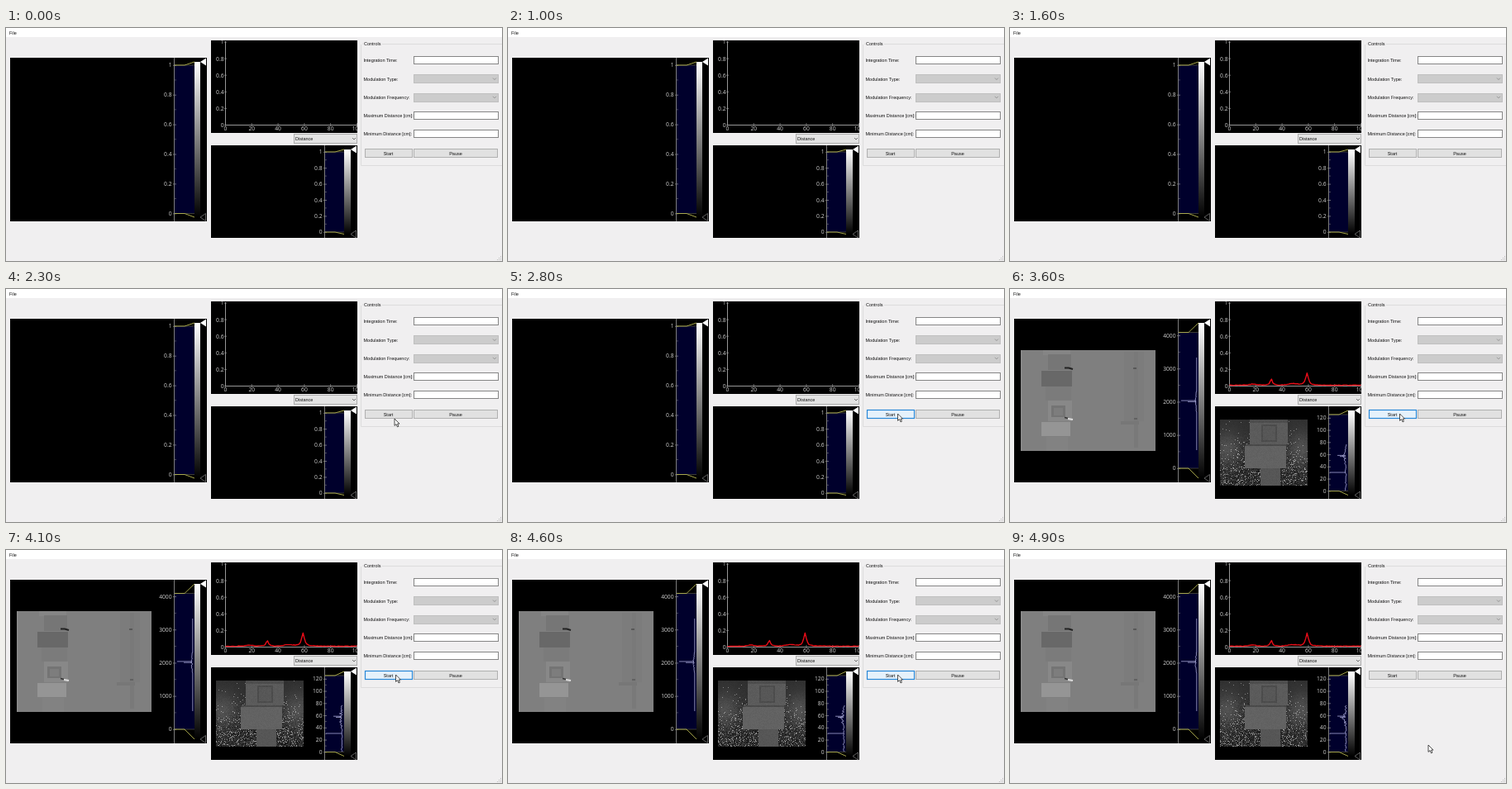
An HTML page with a canvas for the animation above (5 s loop, 600 by 282 pixels).

```html
<!DOCTYPE html>
<html lang="en">
<head>
<meta charset="utf-8">
<title>Sensor viewer</title>
<style>
  html, body { margin: 0; width: 100%; height: 100%; overflow: hidden; background: #f0eff0; }
  svg, canvas { position: absolute; display: block; }
  svg { left: 0; top: 0; }
  canvas { left: 254px; top: 158px; visibility: hidden; }
  text { font: 5.5px "Liberation Sans", Arial, sans-serif; fill: #111; }
  .tick { font: 6.7px "Open Sans", "Noto Sans", sans-serif; fill: #d4d4d4; }
</style>
</head>
<body>
<svg id="stage" width="600" height="282" viewBox="0 0 600 282"></svg>
<canvas id="depth" width="106" height="80"></canvas>
<script>
const LOOP = 5000, STEP = 100, LIVE_AT = 3600;
const HOVER_FROM = 2500, HOVER_TO = 4700;

// time, x, y of the pointer tip
const POINTER = [
  [2100, 500, 230], [2200, 479, 180], [2300, 470, 157], [2400, 470, 156],
  [2500, 471, 152], [2600, 471.5, 151], [4700, 479, 170], [4800, 497, 214], [4900, 506, 236]
];

const rect = (x, y, w, h, fill, extra = '') =>
  `<rect x="${x}" y="${y}" width="${w}" height="${h}" fill="${fill}" ${extra}/>`;
const path = (d, stroke, width = 1, extra = '') =>
  `<path d="${d}" fill="none" stroke="${stroke}" stroke-width="${width}" ${extra}/>`;
const label = (x, y, s, extra = '') => `<text x="${x}" y="${y}" ${extra}>${s}</text>`;
const tick = (x, y, s, anchor = 'end') =>
  label(x, y + 2.4, s, `class="tick" text-anchor="${anchor}"`);
const box = (x, y, w, h, fill, stroke, extra = '') =>
  rect(x + .5, y + .5, w - 1, h - 1, fill, `stroke="${stroke}" ${extra}`);
const chevron = (x, y, color) => path(`M${x - 2} ${y - 1}l2 2l2 -2`, color, .8);

function random(seed) {
  let a = seed >>> 0;
  return () => {
    a = a + 0x6D2B79F5 | 0;
    let r = Math.imul(a ^ a >>> 15, 1 | a);
    r = r + Math.imul(r ^ r >>> 7, 61 | r) ^ r;
    return ((r ^ r >>> 14) >>> 0) / 4294967296;
  };
}

// Level range, axis ticks and slanted lines to the gradient bar
function levels(p, top, bottom, marks) {
  const x = p.axis, n = marks.length - 1;
  const first = marks[0].y, gap = (marks[n].y - first) / n;
  let out = rect(x + 1, top, p.bar - x - 1, bottom - top, '#00002c');
  let major = '', minor = '';
  marks.forEach((m, i) => {
    out += tick(x - 2.5, m.y, m.s);
    major += `M${x - 1} ${m.y + .3}h4`;
    if (i < n) minor += `M${x + 1} ${first + gap * (i + .5)}h2`;
  });
  out += path(major, '#999', .7) + path(minor, '#777', .6);
  out += path(`M${x + 1} ${top}H${p.bar}M${x + 1} ${bottom}H${p.bar}`, '#62624a', .6);
  out += path(`M${x + 1} ${top}h12L${p.bar} ${p.top}M${x + 1} ${bottom}h12L${p.bar} ${p.bottom}`, '#b5b552', .9);
  return out;
}

function bar(p) {
  const w = p.wide, x = p.bar + w;
  return path(`M${p.axis + .5} ${p.y}V${p.y + p.h}`, '#8c8c8c', .9) +
    rect(p.bar, p.top, w, p.bottom - p.top, 'url(#ramp)') +
    `<path d="M${x} ${p.top}l7 -4.5v9z" fill="#fff"/>` +
    `<path d="M${x} ${p.bottom}l6.5 -4.5v9z" fill="#000" stroke="#888" stroke-width=".7"/>`;
}

const scale = (names, y0, y1) =>
  names.map((s, i) => ({ s, y: y0 + (y1 - y0) * i / (names.length - 1) }));

const UNIT = ['1', '0.8', '0.6', '0.4', '0.2', '0'];
const LEFT = { axis: 203, bar: 228, wide: 7, top: 41, bottom: 229, y: 36, h: 198 };
const LOW = { axis: 385, bar: 409, wide: 8, top: 147, bottom: 249.5, y: 142, h: 112 };

function amplitude() {
  return `<g filter="url(#soft)" clip-path="url(#amp)">` +
    rect(13, 74, 163, 122, '#7f7f7f') +
    rect(13, 74, 1.5, 122, '#8b8b8b') +
    rect(40, 74, 33, 6, '#858585') +
    rect(46, 79, 28, 19, '#767676') +
    rect(38, 99, 37, 19, '#686868') +
    rect(43, 118, 31, 17, '#7b7b7b') +
    rect(46, 135, 29, 25, '#888') +
    rect(50, 141, 17, 14, '#747474') +
    rect(53, 144, 11, 9, '#7d7d7d') +
    rect(38, 161, 35, 17, '#959595') +
    rect(44, 179, 26, 17, '#828282') +
    rect(138, 76, 24, 84, '#7c7c7c') +
    rect(150, 76, 5, 116, '#797979') +
    rect(134, 160, 22, 4, '#777') +
    path('M66 95.5h5l5 1.5', '#222', 2) +
    path('M66 155.5l4 1', '#333', 1.5) + path('M70 157l6 1', '#ddd', 2) +
    path('M149 96h4', '#505050', 1.6) + path('M150 157h4', '#5c5c5c', 1.6) +
    '</g>';
}

function controls() {
  let out = path('M431 19H432M455 19.5H600M429.5 20V166.5H600', '#dcdcdc');
  out += label(433, 20.8, 'Controls');
  const rows = ['Integration Time:', 'Modulation Type:', 'Modulation Frequency:',
    'Maximum Distance [cm]:', 'Minimum Distance [cm]:'];
  rows.forEach((name, i) => {
    const y = 39.3 + 22.25 * i, top = Math.round(y - 5.2), list = i == 1 || i == 2;
    out += label(432.5, y + 2, name);
    out += list ? box(493, top, 103, 11, '#ccc', '#bfbfbf') + chevron(591, y, '#888')
      : box(493, top, 103, 10, '#fff', '#858585');
  });
  return out + '<g id="start"></g>' + box(493, 146, 102, 11, '#e1e1e1', '#b0b0b0') +
    label(544, 153.5, 'Pause', 'text-anchor="middle"');
}

function build() {
  const dots = [[598, 276], [596, 278], [598, 278], [594, 280], [596, 280], [598, 280]];
  let topPlot = rect(248, 15, 177, 112, '#000') + '<g clip-path="url(#plot)">';
  let marks = '';
  UNIT.forEach((s, i) => {
    topPlot += tick(263.5, 17 + 20.1 * i, s);
    marks += `M264 ${17 + 20.1 * i}h3`;
    topPlot += tick(265.5 + 31.8 * i, 121.8, String(20 * i), 'middle');
    marks += `M${265.5 + 31.8 * i} 115v4`;
  });
  topPlot += path('M265.5 16V117.5H425', '#a8a8a8', .9) + path(marks, '#999', .7) +
    '<path id="curve" fill="none" stroke="#e80c18" stroke-width="1.4" stroke-linejoin="round"/></g>';

  const idle = levels(LEFT, 45, 224.5, scale(UNIT, 45, 224.5)) +
    levels(LOW, 150, 247, scale(UNIT, 150, 247));
  const live = levels(LEFT, 52.5, 217, scale(['4000', '3000', '2000', '1000', '0'], 56.3, 217)) +
    levels(LOW, 152, 244.5, scale(['120', '100', '80', '60', '40', '20', '0'], 156, 244.5)) +
    amplitude() + path('', '#a9a9d6', .8, 'id="histLeft"') + path('', '#a9a9d6', .8, 'id="histLow"');

  document.getElementById('stage').innerHTML = `<defs>
    <linearGradient id="ramp" x1="0" y1="0" x2="0" y2="1"><stop stop-color="#fff"/><stop offset="1"/></linearGradient>
    <filter id="soft" x="0" y="0" width="1" height="1"><feGaussianBlur stdDeviation=".4"/></filter>
    <clipPath id="plot">${rect(248, 15, 177, 112, '#000')}</clipPath>
    <clipPath id="amp">${rect(13, 74, 163, 122, '#000')}</clipPath></defs>` +
    rect(0, 0, 600, 282, '#f0eff0') + rect(0, 0, 600, 11, '#fff') + label(4, 7.8, 'File') +
    rect(5, 36, 238, 198, '#000') + topPlot + rect(248, 142, 177, 112, '#000') +
    `<g id="idle">${idle}</g><g id="live">${live}</g>` + bar(LEFT) + bar(LOW) +
    box(348, 128, 77, 12, '#e3e3e3', '#adadad') + label(350, 136, 'Distance') + chevron(421, 134, '#555') +
    controls() + dots.map(([x, y]) => rect(x, y, 1, 1, '#bbb')).join('') +
    '<path id="pointer" d="M0 0V8.4L2 6.6L3.5 9.9L4.9 9.2L3.5 6.1H6Z" fill="#fff" stroke="#222" stroke-width=".8"/>';
}

const inside = (x, y, l, t, r, b) => x >= l && x < r && y >= t && y < b;

// Grey value of the object in the depth picture, or 0 outside it
function objectGrey(x, y) {
  if (inside(x, y, 31, 30, 80, 32)) return 74;
  if (inside(x, y, 30, 32, 80, 59)) return 98;
  if (inside(x, y, 36, 0, 82, 30)) {
    if (inside(x, y, 50, 6, 69, 27))
      return inside(x, y, 52, 8, 67, 25) ? 87 : 76;
    return y < 4 ? 78 : 91;
  }
  if (inside(x, y, 49, 59, 73, 80)) return 86;
  return 0;
}

function drawDepth(n) {
  const fixed = random(77), flick = random(900 + n * 131);
  const image = ctx.createImageData(106, 80);
  for (let i = 0; i < 106 * 80; i++) {
    const x = i % 106, y = i / 106 | 0;
    const a = fixed(), b = flick();
    let v = objectGrey(x, y);
    if (v) v += (b - .5) * 7;
    else {
      const glow = Math.exp(-(((x - 8) / 18) ** 2) - ((y - 36) / 21) ** 2) +
        Math.exp(-(((x - 98) / 17) ** 2) - ((y - 36) / 21) ** 2);
      const rough = Math.min(1, Math.max(.08, (y - 10) / 38)) * (1 - .72 * Math.min(1, glow));
      const r = b < .45 ? flick() : a;
      v = 47 + 34 * glow + (r - .5) * 56 * rough;
      if (r > 1 - .13 * rough) v += 75;
    }
    image.data.set([v, v, v, 255], i * 4);
  }
  ctx.putImageData(image, 0, 0);
}

function drawTraces(n) {
  const rnd = random(n * 57 + 5);
  const near = .068 + rnd() * .018, far = .145 + rnd() * .02;
  const peak = (x, c, w) => 1 / (1 + ((x - c) / w) ** 2);
  let d = 'M';
  for (let x = 0; x <= 100; x++) {
    const value = .006 + rnd() * .006 + near * peak(x, 31.8, 1) + far * peak(x, 59, 1.25) +
      .012 * Math.exp(-(((x - 18) / 4) ** 2)) + .017 * Math.exp(-(((x - 48) / 5) ** 2));
    d += `${265.5 + x * 1.59} ${(117.3 - 100.5 * value).toFixed(2)} `;
  }
  curve.setAttribute('d', d);

  const shift = rnd() * .6;
  d = 'M225.8 83V124';
  for (let y = 124; y < 149; y++)
    d += `L${(225.5 - rnd() * 2.2 * Math.exp(-(((y - 136) / 8) ** 2))).toFixed(1)} ${y}`;
  histLeft.setAttribute('d', d + `L225.8 149V195M225 ${134.7 + shift}H207M225 ${136 + shift}H215`);

  d = 'M407 188';
  for (let y = 189; y < 245; y++) {
    const spread = Math.exp(-(((y - 203) / 7) ** 2)) * 4 + 1.6;
    d += `L${(407 - rnd() * spread).toFixed(1)} ${y}`;
  }
  histLow.setAttribute('d', d + `M406 ${201 + shift}H396M406 ${202.3 + shift}H399M406 222H387`);
}

function drawStart(hover) {
  start.innerHTML = (hover ? box(434, 146, 58, 11, '#e5f1fb', '#2888d8', 'stroke-width="1.2"')
    : box(434, 146, 58, 11, '#e1e1e1', '#b0b0b0')) +
    label(462.5, 153.5, 'Start', 'text-anchor="middle"');
}

build();
const el = id => document.getElementById(id);
const [idle, live, curve, histLeft, histLow, start, pointer, depth] =
  ['idle', 'live', 'curve', 'histLeft', 'histLow', 'start', 'pointer', 'depth'].map(el);
const ctx = depth.getContext('2d');
const show = (node, on) => { node.style.visibility = on ? 'visible' : 'hidden'; };

function draw(n) {
  const t = n * STEP, on = t >= LIVE_AT;
  show(idle, !on);
  [live, curve, depth].forEach(node => show(node, on));
  if (on) { drawDepth(n); drawTraces(n); }
  drawStart(t >= HOVER_FROM && t < HOVER_TO);
  const pose = POINTER.filter(p => p[0] <= t).pop();
  show(pointer, pose);
  if (pose) pointer.setAttribute('transform', `translate(${pose[1]} ${pose[2]})`);
}

const begin = performance.now();
let last = -1;
function frame() {
  const n = Math.floor((performance.now() - begin) % LOOP / STEP);
  if (n !== last) draw(last = n);
  requestAnimationFrame(frame);
}
frame();
</script>
</body>
</html>
```
